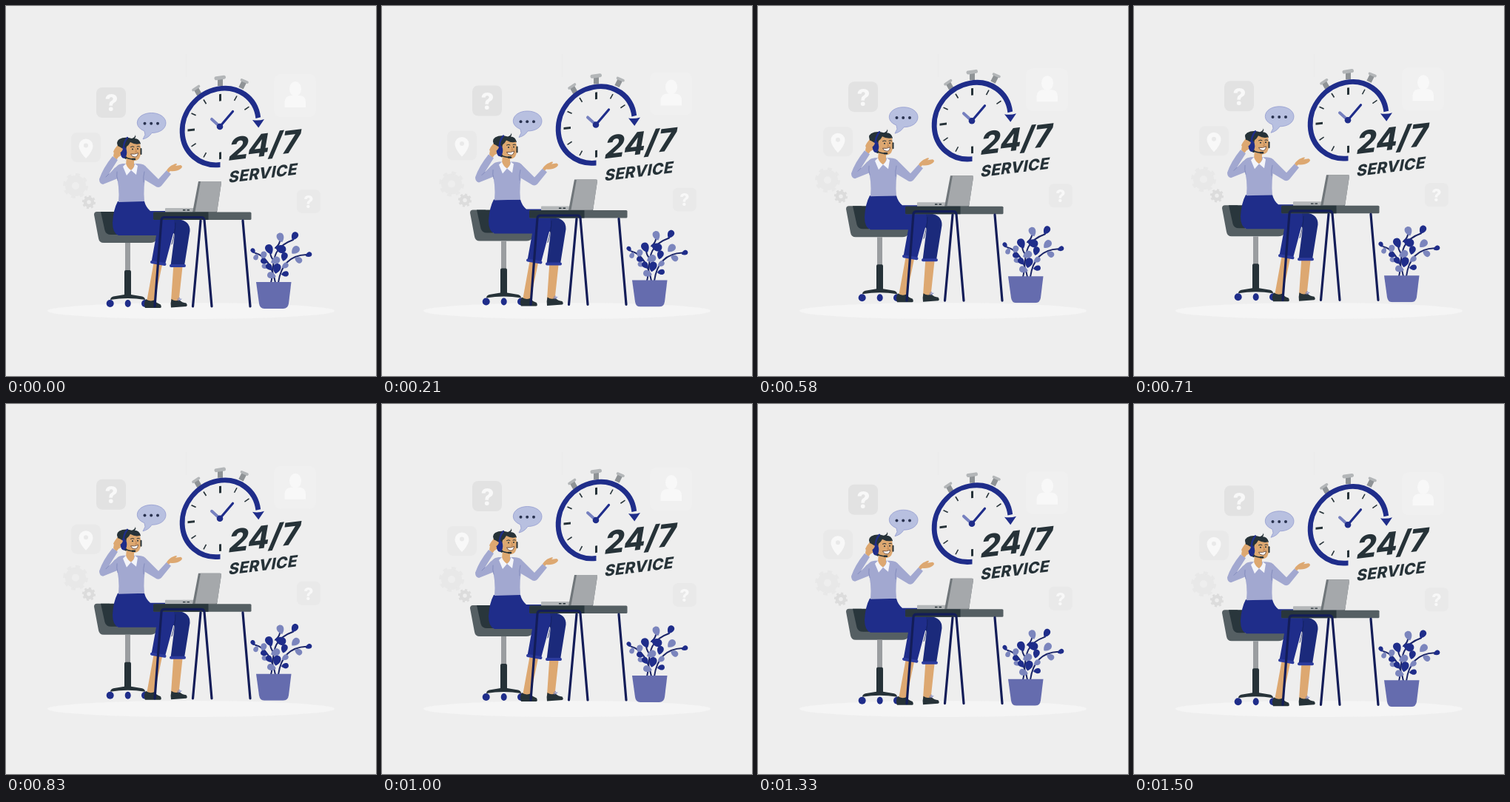
Animation, 500 px wide and 500 px high, one loop 1.54 s. Source, as an HTML page:

```html
<!DOCTYPE html>
<html lang="en">
<head>
<meta charset="utf-8">
<title>24/7 Service</title>
<style>
  html, body { margin: 0; width: 100%; height: 100%; overflow: hidden; background: #eee; }
  svg { display: block; width: 100vw; height: 100vh; }
  text { font-family: Inter, "Open Sans", sans-serif; font-weight: 800; }
  .navy { fill: #1f2d8a; }
  .dark { fill: #263238; }
  .skin { fill: #dda871; }
  .shirt { fill: #a2a8d0; }
  .line { fill: none; stroke-linecap: round; stroke-linejoin: round; }
  .fold { stroke: #7c84b8; stroke-width: .8; }
</style>
</head>
<body>
<svg viewBox="0 0 500 500">
  <path d="M243.5 65V96" stroke="#ebebeb"/>
  <ellipse cx="250" cy="412" rx="194" ry="11" fill="#f5f5f5"/>

  <g id="scene">
    <!-- faint icons -->
    <g text-anchor="middle" fill="#f8f8f8">
      <rect x="122" y="110" width="40" height="41" rx="8" fill="#e2e2e2"/>
      <text x="142.500" y="142.500" font-size="31">?</text>
      <rect x="393" y="248" width="32" height="32" rx="7" fill="#e9e9e9"/>
      <text x="409" y="273" font-size="23">?</text>
      <rect x="88" y="171" width="40" height="40" rx="8" fill="#e9e9e9"/>
      <path d="M108 206C103 201 98.500 194 98.500 189A9.500 9.500 0 0 1 117.500 189C117.500 194 113 201 108 206Z"/>
      <circle cx="108" cy="188.500" r="3" fill="#e9e9e9"/>
      <rect x="362" y="92" width="57" height="58" rx="9" fill="#f0f0f0"/>
      <ellipse cx="391" cy="112" rx="8" ry="10"/>
      <path d="M376.500 137V130Q377 121 386 121H396Q405 121 405 130V137Z"/>
    </g>
    <g fill="none" stroke="#e8e8e8">
      <circle cx="94" cy="243" r="9.500" stroke-width="9"/>
      <circle cx="94" cy="243" r="15" stroke-width="4" pathLength="16" stroke-dasharray="1"/>
      <g stroke="#dcdcdc">
        <circle cx="112" cy="265" r="5" stroke-width="4.500"/>
        <circle cx="112" cy="265" r="7.900" stroke-width="2.400" pathLength="16" stroke-dasharray="1"/>
      </g>
    </g>

    <!-- speech bubble -->
    <path d="M187 169L188 174L185 180Q193 178 197 171.500C208 171.500 216 166 216 158C216 150 207 144.500 196.500 144.500S177.300 150 177.300 158Q177.500 165 187 169Z" fill="#b8c0e0" stroke="#929bd0" stroke-width=".8"/>
    <g fill="#29324f"><circle cx="187.500" cy="158.700" r="2"/><circle cx="196.200" cy="158.700" r="2"/><circle cx="205" cy="158.700" r="2"/></g>

    <!-- stopwatch -->
    <g fill="none" stroke="#8f9396" stroke-width="7">
      <path d="M289.500 108V98M261.500 120L257 112M317.500 111L322 102"/>
      <g stroke="#b3b6b8" stroke-width="5" stroke-linecap="round">
        <path d="M284 97.800L294.500 96.200"/>
        <path d="M253 113.500L260.500 108.500M318.500 100L326 103.200" stroke-width="3.600"/>
      </g>
    </g>
    <g transform="translate(289.500 163) skewY(-6.500)">
      <path d="M0 51.500A51.500 51.500 0 1 1 51.300 -6" fill="none" stroke="#1f2d8a" stroke-width="6.800"/>
      <g id="ticks" stroke="#263238"></g>
    </g>
    <path class="navy" d="M333 154Q341 155.500 349 153L341.200 164.500Z"/>
    <g class="line">
      <path d="M289 163L278 153" stroke="#7680bf" stroke-width="4"/>
      <path d="M289 163L306.500 142.500" stroke="#1f2d8a" stroke-width="3.200"/>
    </g>
    <circle class="navy" cx="289" cy="163" r="4.300"/>
    <g class="dark">
      <text transform="translate(299 209) skewY(-7) skewX(-10)" font-size="42">24/7</text>
      <text transform="translate(300 239) skewY(-7) skewX(-11)" font-size="21" letter-spacing=".3">SERVICE</text>
    </g>

    <!-- chair -->
    <path d="M119 282Q119 278 123 278H140L150 309H203Q207 310 203 316Q201 320 195 320H132Q126 320 125 314Z" fill="#555f63"/>
    <path d="M128 278H156V309H142Q135 309 133.500 303Z" fill="#29363c"/>
    <path d="M161 320H168V358H161Z" fill="#9a9da0"/>
    <g class="navy"><circle cx="140.700" cy="402" r="5"/><ellipse cx="164.700" cy="402" rx="4" ry="5"/><circle cx="188" cy="402" r="5"/></g>
    <path class="dark" d="M160 359Q160 357 162 357H167Q169 357 169 359V390L184 392.500Q188 393.500 188 397Q176 395 164.500 395T141 397Q141 393.500 145 392.500L160 390Z"/>

    <!-- legs -->
    <path class="skin" d="M200 345H212L200.500 400H190ZM226.500 348H239L233.500 399H223Z"/>
    <path class="dark" d="M189 396Q194 400 200 397.500Q204 402 209 403.500Q211 408 208 408H188Q185.500 402 189 396ZM223.500 396Q229 400 234 397Q238 401 243.500 401.500Q246 405 243.500 406L223 407.500Q222 402 223.500 396Z"/>
    <path class="line" d="M232 397Q234 393 235 395Q236 397 233 398M234 398L237 396" stroke="#7680bf"/>
    <path d="M186 288H232Q249 290 248.500 304L241 351H222.500L228 308Z" fill="#1b2a7b"/>
    <path class="navy" d="M151 264H187Q189 272 195 277H215Q229 281 228 300L215 349L196.500 346L203 310H152Q144 307 144 293Q145 275 151 264Z"/>
    <path class="line" d="M197 346L214.500 349M223 351H241" stroke="#2c3b9d" stroke-width="4"/>
    <path class="line" d="M229 293Q229 306 224 322" stroke="#14205f" stroke-width=".8"/>

    <!-- torso and arms -->
    <path class="shirt" d="M178 214Q187 214 190 218L206 234L217 222L223 227L210 243Q206 247 201 243L186 234Z"/>
    <path class="skin" d="M217 222Q221 216 226 214.500Q231 212 231 214L229 216L236 215Q240 217 236 220Q230 224 222 223L220 225Z"/>
    <path class="skin" d="M145 203Q146 195 150 189Q153 185 157 188L160 194L157 201L152 204L149 208Z"/>
    <path class="shirt" d="M160 213Q149 215 144 222L139 227L151 208L144 203Q131 219 126 234Q126 240 131 241L151 233Z"/>
    <path class="shirt" d="M158 213Q147 214 148 224Q154 244 152 265L187 264Q185 246 190 219Q188 213 178 213Z"/>
    <path class="line fold" d="M139 227L135 231M150 224Q149 230 151 236M187 224Q185 231 186 238"/>
    <path class="skin" d="M163 203H173V214Q174 218 169 222Q163 219 162 215Z"/>
    <path d="M162 213Q164 219 169 222L163 229L158 217ZM174 213Q174 218 169 222L176 228L178 216Z" fill="#f4f5fa"/>

    <!-- head -->
    <path class="dark" d="M153 192Q147 184 153 180Q160 176 170 179Q174 178 175 174Q176 177 174 179Q180 179 182 186L178 190L162 207Q155 205 153 192Z"/>
    <path class="skin" d="M163 190Q166 188 168 184Q175 188 181 186Q184 199 180 206Q176 210 170 209Q163 207 161 200Z"/>
    <path d="M168.500 200Q174 201 178.500 198.500Q178 204 174 204Q170 204 168.500 200Z" fill="#fff" stroke="#59392b" stroke-width=".8"/>
    <g class="dark"><circle cx="171" cy="193.500" r="1"/><circle cx="178" cy="193" r="1"/></g>
    <g class="line" stroke="#263238">
      <path d="M168.500 190.500Q171 189 173 190.300M177 190Q179 189 180.500 190"/>
      <path d="M175 193L176.500 197L174.500 197.300" stroke="#b87a4b" stroke-width=".8"/>
      <path d="M160 203Q164 207 173 207" stroke-width="1.500"/>
      <path d="M171 207H174" stroke-width="2.500"/>
      <path d="M182.500 193V200" stroke-width="2"/>
      <path d="M164 178Q158 185 159 195" stroke="#1f2d8a" stroke-width="2.400"/>
    </g>
    <ellipse class="navy" cx="159" cy="198" rx="4.300" ry="7.800"/>
    <path class="skin" d="M145 197Q149 188 153 190L158 193Q157 197 153 199L150 205Z"/>

    <!-- laptop and desk -->
    <rect x="215" y="273" width="44" height="6" rx="1" fill="#b4b7b9"/>
    <path d="M239 275.800H242.500M244.500 275.800H248" stroke="#263238" stroke-width="1.400"/>
    <path d="M260 237H289Q291.500 237 291 239L285 279H252Z" fill="#70767a"/>
    <path d="M263 237H289Q291.500 237 291 239L285.500 276Q285 278 283 278H255.500Z" fill="#a5a8ab"/>
    <rect x="199" y="278.500" width="132.500" height="10.500" rx="1.500" fill="#555f63"/>
    <path d="M200.500 278.500H273.500V289H200.500Q199 289 199 287.500V280Q199 278.500 200.500 278.500Z" fill="#29363c"/>
    <path class="line" d="M201 406L210 289Q210.500 285.500 214 285.500H264Q267.500 285.500 268 289L278 406M263 290L252.500 406M320 290L330 406" stroke="#131d58" stroke-width="3.200"/>

    <!-- plant -->
    <g class="line" stroke="#1b2567" stroke-width="2">
      <path d="M358 374C364 352 354 328 388 316M368 374C371 352 382 337 406 336M364 374C360 352 350 337 337 334M361 343Q357 338 357 332M364 327Q369 323 370 318"/>
    </g>
    <g id="leaves"></g>
    <path d="M338 373H385.500L382 402Q381 409 374.500 409H349Q343 409 342 402Z" fill="#656cae"/>
  </g>
</svg>
<script>
  const $ = id => document.getElementById(id);
  const add = (parent, tag, attrs) => {
    const el = document.createElementNS('http://www.w3.org/2000/svg', tag);
    for (const key in attrs) el.setAttribute(key, attrs[key]);
    parent.append(el);
  };

  // Dial marks; the lower right is left open for the lettering.
  for (const hour of [0, 1, 2, 6, 7, 8, 9, 10, 11]) {
    const major = hour % 3 === 0;
    add($('ticks'), 'path', {
      d: major ? 'M0 -44V-34.500' : 'M0 -45V-38',
      'stroke-width': major ? 3 : 1.600,
      transform: `rotate(${hour * 30})`
    });
  }

  // Leaf centre, tilt and length.
  const pale = [
    [371, 313, -20, 13], [338, 339, 205, 9], [348, 337, 15, 11], [391, 330, 45, 13],
    [395, 343, 120, 11], [364, 344, 65, 13], [350, 352, -60, 9], [377, 351, 55, 10],
    [359, 364, -75, 12]
  ];
  const deep = [
    [390, 311, 30, 12], [356, 329, -25, 14], [334, 331, -35, 8], [371, 328, 110, 15],
    [409, 336, 65, 9], [376, 339, 15, 12], [349, 345, -70, 10], [366, 355, 15, 14],
    [377, 362, 85, 10], [356, 353, -40, 11]
  ];
  const grow = (leaves, fill) => {
    for (const [x, y, tilt, size] of leaves) {
      add($('leaves'), 'path', {
        d: 'M0 .5C-.28 .3 -.4 0 -.36 -.2C-.3 -.6 .3 -.6 .36 -.2C.4 0 .28 .3 0 .5Z',
        fill,
        transform: `translate(${x} ${y}) rotate(${tilt}) scale(${size})`
      });
    }
  };
  grow(pale, '#7b85bd');
  grow(deep, '#1f2d8a');

  // Slow float: time in ms, vertical shift.
  const loop = 1540;
  const steps = [
    [0, 0], [210, -2.5], [420, -5.4], [580, -7.8], [640, -8.4], [705, -8.7],
    [770, -8.6], [830, -8.2], [1000, -6], [1170, -3.5], [1340, -1.2], [1500, .3], [loop, 0]
  ];
  $('scene').animate(
    steps.map(([time, y]) => ({ offset: time / loop, transform: `translateY(${y}px)` })),
    { duration: loop, iterations: Infinity }
  );
</script>
</body>
</html>
```
